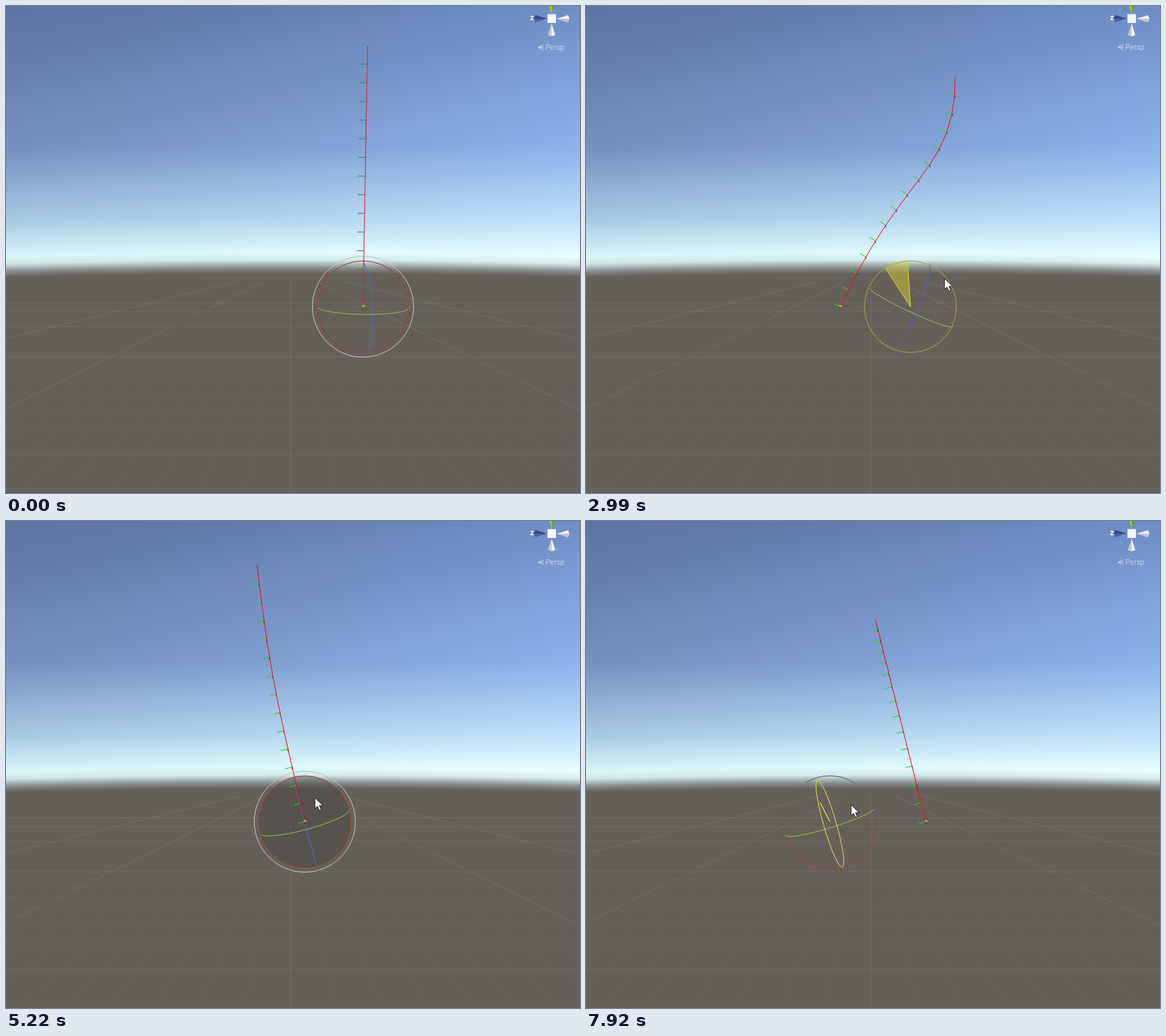
These frames come from a looping animation (812x690 px, 8 s). An HTML page with a canvas:

```html
<!DOCTYPE html>
<html lang="en">
<head>
<meta charset="utf-8">
<title>Chain following a rotation handle</title>
<style>
  html, body { margin: 0; width: 100%; height: 100%; overflow: hidden; background: #66605b; }
  canvas { display: block; }
</style>
</head>
<body>
<canvas id="stage" width="812" height="690"></canvas>
<script>
const W = 812, H = 690, LOOP = 8000, STEP = 77;
const CENTER_X = 403, HORIZON = 372, ROOT_Y = 426;
const LINKS = 14, LINK = 26.43, LAG = 30, RADIUS = 65;
const ctx = document.getElementById('stage').getContext('2d');

// Turning points [time, value, ...]; the motion eases from one to the next.
const rootPath = [[250, 505], [1900, 334], [2600, 334], [4200, 505], [4430, 505], [6280, 296], [8700, 541]];
const turnPath = [[0, 1], [1650, -2], [2150, -60], [2570, 0], [2770, 37], [3010, 26], [3370, 114], [3430, 114],
  [3830, -62], [4250, -8], [4830, -7], [5150, -13], [5950, -14], [6080, -32], [6140, -31], [6360, -11], [6900, -14]];
const stretchPath = [[6900, 1], [7150, 1.18], [7530, .56], [7920, 1.04]];
const cursorPath = [[70, 660, 648], [880, 424, 371], [1300, 415, 368], [2150, 265, 386], [2800, 525, 384],
  [3000, 507, 386], [3390, 690, 390], [3830, 285, 405], [4300, 420, 395], [5220, 437, 392], [5900, 362, 384],
  [6080, 322, 355], [6560, 298, 446], [6980, 331, 399], [7620, 325, 525], [7920, 375, 402]];
// During a drag the handle stays where it was grabbed.
const drags = [
  { from: 880, to: 4250, x: 459, grab: -122.4, rest: -2 },
  { from: 5900, to: 6800, x: 312, grab: -40, rest: -12 },
  { from: 6980, to: LOOP, x: 345, side: true }
];

const rad = deg => deg * Math.PI / 180;
const mix = (a, b, k) => a + (b - a) * k;
const ease = k => k * k * (3 - 2 * k);

function sample(keys, t, part = 1) {
  const next = keys.findIndex(key => key[0] > t);
  if (next === 0) return keys[0][part];
  if (next < 0) return keys[keys.length - 1][part];
  const a = keys[next - 1], b = keys[next];
  return mix(a[part], b[part], ease((t - a[0]) / (b[0] - a[0])));
}

const turn = t => sample(turnPath, t);

function path(g, points, stroke, fill, width = 1) {
  g.beginPath();
  points.forEach(([x, y]) => g.lineTo(x, y));
  if (fill) { g.closePath(); g.fillStyle = fill; g.fill(); }
  if (stroke) { g.strokeStyle = stroke; g.lineWidth = width; g.stroke(); }
}

function arc(x, y, r, stroke, from = 0, to = 360) {
  ctx.beginPath();
  ctx.arc(x, y, r, rad(from), rad(to));
  ctx.strokeStyle = stroke;
  ctx.lineWidth = 1;
  ctx.stroke();
}

function drawSky(g) {
  const ground = [102, 96, 91], dusk = [136, 142, 140];
  // [height, colour at the left, colour at the right]
  const bands = [
    [0, [91, 115, 159], [111, 143, 198]],
    [200, [118, 146, 192], [142, 180, 234]],
    [300, [168, 203, 228], [191, 226, 252]],
    [350, [214, 246, 245], [232, 255, 255]],
    [360, [208, 232, 231], [216, 236, 236]],
    [371, dusk, dusk],
    [379, ground, ground]
  ];
  for (let x = 0; x < W; x += 4) {
    const sag = 5 * ((x - CENTER_X) / CENTER_X) ** 2;
    const fade = g.createLinearGradient(0, sag, 0, H + sag);
    for (const [y, left, right] of bands) {
      const rgb = left.map((c, i) => Math.round(mix(c, right[i], (x / W) ** 1.2)));
      fade.addColorStop(y / H, `rgb(${rgb})`);
    }
    g.fillStyle = fade;
    g.fillRect(x, 0, 4, H);
  }
}

function drawGround(g) {
  const color = alpha => `rgba(150,148,142,${alpha})`;
  const reach = 2.035;
  const ray = (slope, top, alpha) =>
    path(g, [[CENTER_X + slope * (top - HORIZON), top], [CENTER_X + slope * (H - HORIZON), H]], color(alpha));
  for (let k = -20; k <= 20; k++) {
    const main = k % 10 === 0;
    ray(k * reach / 10, main ? 390 : 525, main ? .25 : .08);
  }
  for (let k = 0; k < 30; k++) {
    const y = HORIZON + 1 / (.0032 + .0006 * k), main = k % 7 === 1;
    if (main || k < 8) path(g, [[0, y], [W, y]], color(main ? .2 : .08));
  }
}

function drawCompass(g) {
  const cone = (angle, light, dark) => {
    g.save();
    g.translate(772, 18);
    g.rotate(rad(angle));
    path(g, [[7, 0], [23, -5], [25, 0], [23, 5]], null, light);
    path(g, [[7, 0], [25, 0], [23, 5]], null, dark);
    g.restore();
  };
  cone(0, '#f2f2f2', '#bfc3c8');
  cone(90, '#f4f4f4', '#c8cacd');
  cone(180, '#4763a8', '#31498a');
  cone(270, '#9bd22f', '#719f20');
  g.fillStyle = '#f1f6fd';
  g.fillRect(766, 11.5, 12, 12.5);
  g.font = 'bold 10px Roboto, sans-serif';
  g.fillText('z', 741.5, 20);
  g.fillStyle = '#c3d2e8';
  g.font = '10.5px Roboto, sans-serif';
  g.fillText('Persp', 763, 62);
  [-3.5, 0, 3.5].forEach(dy => path(g, [[752.5, 58.5], [760.5, 58.5 + dy]], '#c3d2e8'));
}

const backdrop = document.createElement('canvas');
backdrop.width = W;
backdrop.height = H;
[drawSky, drawGround, drawCompass].forEach(draw => draw(backdrop.getContext('2d')));

// Ring seen nearly edge-on: its front bulges towards the viewer.
function ring(x, tilt, color) {
  const bulge = (x - CENTER_X) * .13, points = [];
  for (let a = 0; a <= 180; a += 6) {
    const c = RADIUS * Math.cos(rad(a)), s = Math.sin(rad(a));
    points.push([x + c * Math.cos(tilt) + s * bulge, ROOT_Y + c * Math.sin(tilt) + s * 11]);
  }
  path(ctx, points, color);
}

function drawPie(x, from, to) {
  ctx.beginPath();
  ctx.moveTo(x, ROOT_Y);
  ctx.arc(x, ROOT_Y, RADIUS, rad(Math.min(from, to) - .5), rad(Math.max(from, to) + .5));
  ctx.closePath();
  ctx.fillStyle = 'rgba(220,210,50,.45)';
  ctx.fill();
  ctx.strokeStyle = '#d9d43c';
  ctx.lineWidth = 1;
  ctx.stroke();
}

function drawSideHandle(x, tilt) {
  arc(x, ROOT_Y + 1, RADIUS, '#a23f2e', -10, 163);
  arc(x, ROOT_Y, RADIUS, '#53607c', -122, -57);
  ring(x, tilt, '#8fc642');
  ctx.beginPath();
  ctx.ellipse(x, ROOT_Y + 3, 9, 64, tilt, 0, 7);
  ctx.strokeStyle = '#dcd848';
  ctx.stroke();
  path(ctx, [[x, ROOT_Y], [x - 14, ROOT_Y - 27], [x - 9, ROOT_Y - 18]], '#dfda42', '#dfda42');
}

function drawHandle(t, rootX) {
  const drag = drags.find(d => t >= d.from && t < d.to);
  const degrees = turn(t + LAG), tilt = rad(degrees - 2);
  const x = drag ? drag.x : rootX;
  if (drag && drag.side) return drawSideHandle(x, tilt);
  if (drag) {
    drawPie(x, drag.grab, drag.grab + degrees - drag.rest);
  } else if (t > 4000) {
    ctx.beginPath();
    ctx.arc(x, ROOT_Y, RADIUS, 0, 7);
    ctx.fillStyle = 'rgba(64,60,58,.4)';
    ctx.fill();
  }
  ring(x, tilt - Math.PI / 2, '#4a6ac4');
  ring(x, tilt, '#8fc24a');
  arc(x, ROOT_Y, RADIUS, drag ? '#aaa548' : '#963f34');
  if (!drag) arc(x, ROOT_Y, 71.5, '#b9c6c5');
}

// Each link repeats the root's turn a little later; fast turns make the links zigzag.
function linkAngle(t, i) {
  const own = turn(t - i * LAG), later = turn(t - (i + 1) * LAG);
  const zigzag = 2.5 * Math.max(0, Math.abs(own - later) - 9);
  return own + (i % 2 ? zigzag : -zigzag);
}

function drawChain(t, rootX) {
  const joints = [[rootX, ROOT_Y]];
  for (let i = 0; i < LINKS; i++) {
    const angle = rad(linkAngle(t, i)), length = LINK * sample(stretchPath, t - i * LAG);
    const sin = Math.sin(angle), cos = Math.cos(angle), [x, y] = joints[i];
    path(ctx, [[x, y], [x - 10 * cos, y - 10 * sin]], t ? '#16e016' : '#2f8f3f');
    if (t > 1700) path(ctx, [[x, y], [x + (x - CENTER_X) * .012, y + 3]], '#1c2b7c');
    joints.push([x + length * sin, y - length * cos]);
  }
  path(ctx, joints, t ? '#f40d12' : '#d8232b');
  path(ctx, [[rootX - 1, ROOT_Y - 2], [rootX + 2, ROOT_Y]], '#d8c53a', null, 2);
}

function drawCursor(t) {
  if (!t) return;
  const x = sample(cursorPath, t, 1), y = sample(cursorPath, t, 2);
  const shape = [[0, 0], [0, 15.5], [3.6, 12.2], [6.2, 18], [8.8, 16.8], [6.3, 11.2], [11.2, 11], [0, 0]];
  path(ctx, shape.map(([dx, dy]) => [x + dx, y + dy]), '#202020', '#fff');
}

function render(now) {
  const step = Math.floor((now % LOOP + 25) / STEP);
  const t = step ? step * STEP - 13 : 0;
  const rootX = sample(rootPath, t);
  ctx.drawImage(backdrop, 0, 0);
  drawHandle(t, rootX);
  drawChain(t, rootX);
  drawCursor(t);
}

const start = performance.now();
function tick() {
  render(performance.now() - start);
  requestAnimationFrame(tick);
}
tick();
</script>
</body>
</html>
```
